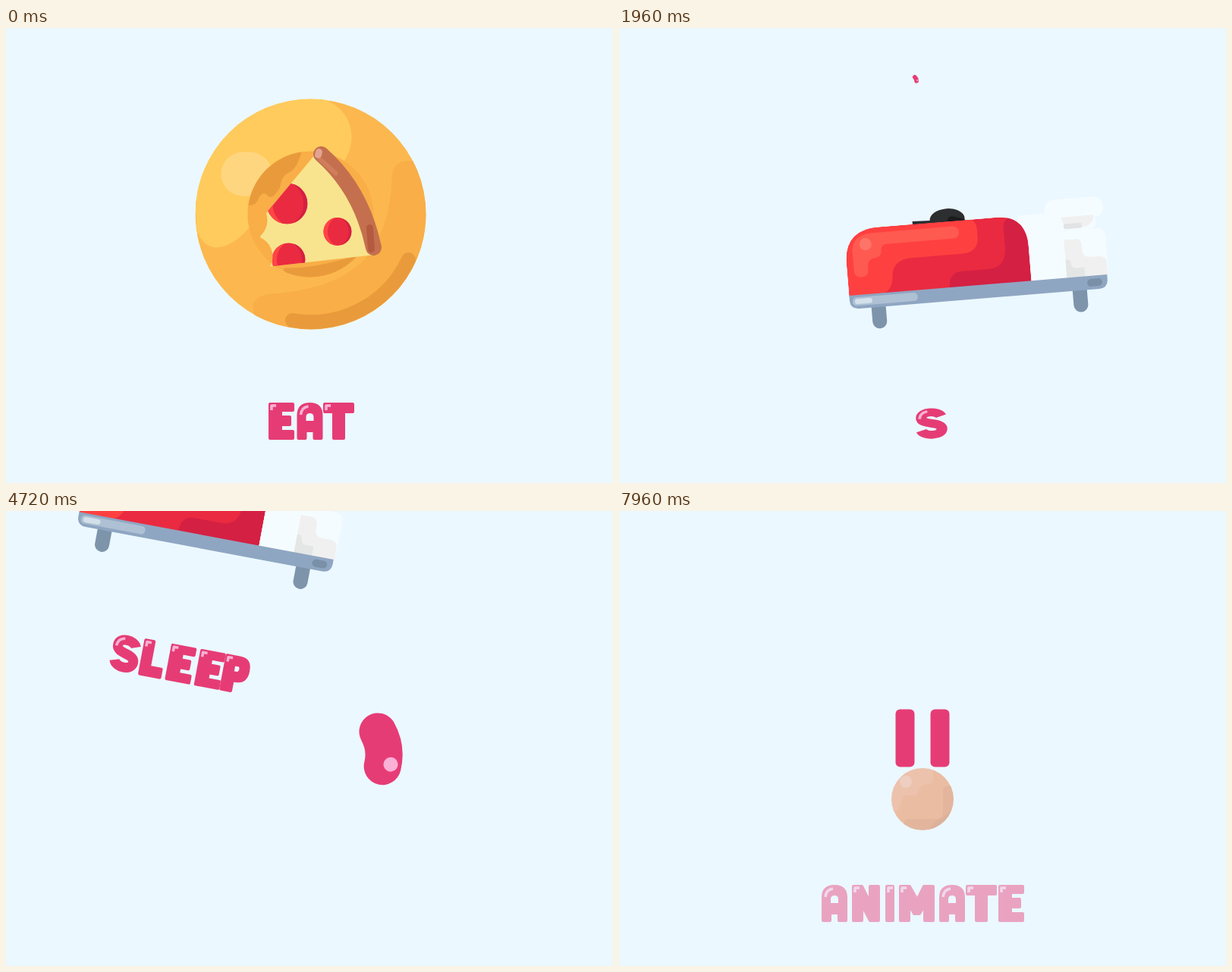
An HTML page for the animation above (8 s loop, 800 by 600 pixels).

```html
<!DOCTYPE html>
<html lang="en">
<head>
<meta charset="utf-8">
<title>Eat, sleep, animate</title>
<style>
  html, body { margin: 0; width: 100%; height: 100%; overflow: hidden; background: #ebf8ff; }
  svg { display: block; width: 100vw; height: 100vh; }
  .letter { fill: #e63c75; stroke: #e63c75; stroke-width: 4; stroke-linejoin: round; fill-rule: evenodd; }
  .letter .shine { fill: none; stroke: #f8b2d4; stroke-width: 3.5; }
  .letter .bend { fill: none; stroke-width: 13; }
  #snore { font: 900 15px Lato, sans-serif; text-anchor: middle; fill: #111; }
</style>
</head>
<body>
<svg viewBox="0 0 800 600">
  <defs>
    <clipPath id="plateClip"><circle r="152"/></clipPath>
    <clipPath id="sliceClip"><path id="slice" d="M7 -80Q64 -30 80 54L-44 68L-123 76Z"/></clipPath>
    <clipPath id="blanketClip"><path d="M-170 -31V-73Q-170 -119 -124 -119H31Q71 -119 71 -76V-31Z"/></clipPath>
    <clipPath id="ballClip"><circle r="41"/></clipPath>
    <mask id="bites" maskUnits="userSpaceOnUse" x="-160" y="-160" width="320" height="320">
      <rect x="-160" y="-160" width="320" height="320" fill="#fff"/>
      <circle cx="-85" cy="8" r="28"/><circle cx="-78" cy="56" r="28"/>
      <circle cx="-98" cy="70" r="40"/><circle cx="-110" cy="20" r="45"/>
      <g id="secondBite">
        <circle cx="-72" cy="0" r="38"/><circle cx="-62" cy="48" r="28"/><circle cx="-45" cy="70" r="24"/>
      </g>
    </mask>
  </defs>

  <g id="eat">
    <g clip-path="url(#plateClip)">
      <circle r="152" fill="#fcb84e"/>
      <path fill="#ffcb5c" d="M10 -155Q54 -140 54 -100Q52 -62 10 -45Q-55 -22 -75 10Q-100 44 -126 44Q-142 42 -150 22L-160 -160Z"/>
      <rect x="-118" y="-82" width="67" height="58" rx="29" fill="#ffd680"/>
      <path fill="#f9ae47" d="M155 -70H124Q107 -67 107 -46Q105 15 75 55Q40 96 -40 104Q-76 105 -76 122L-72 160H160Z"/>
      <path fill="none" stroke="#e99b3c" stroke-width="19" stroke-linecap="round" d="M129 60A142 142 0 0 1 -24 140"/>
      <circle r="83" fill="#f9ae47"/>
      <path fill="#e99b3c" d="M-82 -12A83 83 0 0 1 -12 -82Q-18 -60 -28 -55Q-38 -52 -40 -36Q-50 -18 -56 -24Q-62 -32 -68 -22Q-72 -10 -82 -12ZM-34 71Q5 72 62 54A83 83 0 0 1 -32 77Q-38 74 -34 71Z"/>
    </g>
    <g mask="url(#bites)">
      <use href="#slice" fill="#f8e48e"/>
      <g id="pepperoni" clip-path="url(#sliceClip)"></g>
      <g fill="none" stroke-linecap="round">
        <path stroke="#c4704e" stroke-width="21" d="M14 -79Q67 -32 83 44"/>
        <path stroke="#b45a3e" stroke-width="9" d="M78 18L80 46"/>
        <path stroke="#d07d5c" stroke-width="6" d="M13 -72L33 -54"/>
        <path stroke="#e2a491" stroke-width="9" d="M11 -82L10 -78"/>
      </g>
    </g>
    <g id="eatWord"></g>
  </g>

  <g id="sleep">
    <path fill="#2c2e30" d="M-56 -122A23 14 0 0 1 -10 -122V-112H-79V-123Z"/>
    <path fill="#1b1c1d" d="M-34 -119Q-31 -127 -24 -125T-10 -120V-112H-34Z"/>
    <g fill="#f5fcff">
      <path d="M60 -119H100L119 -110V-31H60Z"/>
      <rect x="96" y="-136" width="77" height="27" rx="12"/>
      <rect x="114" y="-114" width="48" height="20" rx="9"/>
      <rect x="114" y="-94" width="59" height="64" rx="10"/>
    </g>
    <g fill="#f1f0f0">
      <path d="M117 -112H160Q158 -98 144 -97H128Q118 -100 117 -112Z"/>
      <path d="M118 -31V-82H133Q141 -82 141 -72V-65Q142 -57 152 -57H162Q172 -57 172 -46V-31Z"/>
    </g>
    <g fill="#e1e3e4">
      <rect x="119" y="-103" width="24" height="7" rx="3"/>
      <path d="M118 -31V-56Q125 -57 125 -49Q126 -44 132 -44H142V-31Z" opacity=".8"/>
    </g>
    <path fill="#7d94ab" d="M-142 -20H-123V5A9.5 9.5 0 0 1 -142 5ZM124 -20H143V5A9.5 9.5 0 0 1 124 5Z"/>
    <g clip-path="url(#blanketClip)">
      <path fill="#ea2a40" d="M-170 -31V-119H71V-31Z"/>
      <path fill="#d42043" d="M50 -119Q40 -115 40 -105V-75Q38 -52 15 -52H-22Q-37 -50 -37 -31H71V-119Z"/>
      <path fill="#ff4040" d="M-170 -31V-119H-2Q5 -115 5 -105V-95Q5 -76 -16 -75H-85Q-110 -74 -111 -52Q-112 -36 -125 -31Z"/>
      <path fill="#ff5a50" d="M-161 -62V-90Q-160 -111 -135 -112H-27Q-19 -111 -19 -104T-27 -96H-115Q-123 -96 -123 -88T-131 -79Q-141 -79 -142 -70V-64Q-143 -55 -151 -55T-161 -62Z"/>
      <circle cx="-143" cy="-98" r="8" fill="#ff7468"/>
    </g>
    <path fill="#8fa6c2" d="M-170 -32H171V-26Q171 -14 159 -14H-158Q-170 -14 -170 -26Z"/>
    <rect x="-166" y="-29" width="86" height="11" rx="5" fill="#aec0d3"/>
    <rect x="-163" y="-27" width="23" height="7" rx="3.5" fill="#d3e0ea"/>
    <rect x="144" y="-28" width="20" height="10" rx="5" fill="#7a90a8"/>
    <text id="snore">Z</text>
    <g id="sleepWord"></g>
  </g>

  <g id="animate">
    <g id="animateWord"></g>
    <g id="onion">
      <circle r="41" fill="#b4c9f4" opacity=".55"/>
      <circle r="41" fill="#b0ecb8" opacity=".24"/>
      <circle r="41" fill="#b0ecb8" opacity=".38"/>
      <circle r="41" fill="#b0ecb8" opacity=".46"/>
    </g>
    <g id="ball">
      <g clip-path="url(#ballClip)">
        <circle r="41" fill="#e8742f"/>
        <path fill="#ee8148" d="M-41 18Q-30 16 -28 4T-18 -5H-10Q-5 -8 -4 -14T8 -20Q14 -22 14 -30V-45H-45Z"/>
        <path fill="#d96324" d="M41 -18H33Q27 -17 27 -10V18Q26 26 18 26H-20Q-27 28 -25 41H41Z"/>
        <path fill="#cb591d" d="M41 18H34Q31 20 28 23T18 29Q12 32 10 41H41Z"/>
        <circle cx="-22" cy="-23" r="8" fill="#f19a72"/>
      </g>
    </g>
  </g>

  <g id="pause" fill="#e63c75">
    <rect x="-35.5" y="-38" width="25" height="76" rx="6"/>
    <rect x="10.5" y="-38" width="25" height="76" rx="6"/>
  </g>

  <g id="pill">
    <path d="M-23 3Q0 -6 23 3" fill="none" stroke="#e63c75" stroke-width="49" stroke-linecap="round"/>
    <circle cx="22" cy="-8" r="9.5" fill="#fbb0d6"/>
  </g>
</svg>

<script>
const LOOP = 8000, CAP = 49;
const $ = id => document.getElementById(id);
const clamp01 = v => Math.max(0, Math.min(1, v));
const show = (el, on) => el.style.display = on ? '' : 'none';
const place = (el, x, y, angle = 0, sx = 1, sy = sx) =>
  el.setAttribute('transform', `translate(${x} ${y}) rotate(${angle}) scale(${sx} ${sy})`);

// Smooth curve through [time, ...values] keys, held at both ends.
function track(t, keys) {
  const last = keys.length - 1;
  if (t <= keys[0][0]) return keys[0].slice(1);
  if (t >= keys[last][0]) return keys[last].slice(1);
  const i = keys.findIndex(k => k[0] > t) - 1;
  const a = keys[i], b = keys[i + 1], span = b[0] - a[0], u = (t - a[0]) / span;
  const slope = (n, c) => {
    const p = keys[Math.max(0, n - 1)], q = keys[Math.min(last, n + 1)];
    return (q[c] - p[c]) / (q[0] - p[0]) * span;
  };
  return a.slice(1).map((v, j) => {
    const c = j + 1, d = b[c] - v, m = slope(i, c), n = slope(i + 1, c);
    return v + u * (m + u * (3 * d - 2 * m - n + u * (m + n - 2 * d)));
  });
}

// Lettering: width and outline of each glyph.
const GLYPHS = {
  E: [34, 'M2 2H32V10H16V19H28V29H16V38H32V47H2Z'],
  A: [34, 'M2 47V17Q2 2 17 2T32 17V47H23V37H11V47ZM10 26V19Q10 12 17 12T24 19V26Z'],
  T: [41, 'M2 2H39V12H27V47H14V12H2Z'],
  S: [38, 'M31 14C28 5 7 3 7 15C7 27 31 22 31 34C31 46 9 45 6 35'],
  L: [31, 'M2 2H13V36H29V47H2Z'],
  P: [35, 'M2 2H20Q33 2 33 17T20 33H15V47H2Z M13 12H19Q23 12 23 17T19 23H13Z'],
  N: [37, 'M2 2H13L24 24V2H35V47H24L13 26V47H2Z'],
  I: [12, 'M2 2H10V47H2Z'],
  M: [47, 'M2 47V2H14L24 20L33 2H45V47H34V26L27 38H20L13 26V47Z']
};

function makeWord(id, text, offsets) {
  const word = $(id);
  word.setAttribute('role', 'img');
  word.setAttribute('aria-label', text);
  word.innerHTML = [...text].map(ch => {
    const round = 'AS'.includes(ch);
    return `<g class="letter"><path class="${ch === 'S' ? 'bend' : ''}" d="${GLYPHS[ch][1]}"/>
      <path class="shine" d="${round ? 'M5 16Q6 6 15 5' : 'M4 10V4H10'}"/></g>`;
  }).join('');
  const letters = [...word.children];
  // Letters jump in one after another from the baseline.
  return (t, x, y, start) => letters.forEach((el, i) => {
    const age = t - start - i * 80, half = GLYPHS[text[i]][0] / 2;
    const [lift, sy] = track(age, JUMP), sx = 1 + (1 - sy) / 2;
    show(el, age >= 0);
    el.setAttribute('transform', `translate(${x + offsets[i] + half} ${y + CAP - lift})
      scale(${sx} ${sy}) translate(${-half} ${-CAP})`);
  });
}

// age, lift, vertical stretch
const JUMP = [[0, 0, .75], [20, 0, .82], [100, 19, .96], [180, 33, 1.16], [260, 36, 1.19],
  [350, 22, 1.06], [440, 0, .88], [520, 0, 1.03], [600, 0, 1]];

// time, x, y, angle
const PLATE = [[0, 401.5, 245.5, 0], [400, 388, 246, -.5], [640, 330, 260, -3], [840, 206, 290, -6.6],
  [880, 170, 298, -7.3], [1000, 40, 325, -9.5], [1200, -260, 385, -13]];
const BED = [[1280, 1150, 470, -16], [1480, 700, 400, -10], [1720, 512, 374, -6.5], [1960, 475.5, 371, -4.7],
  [2560, 421, 372, -2], [3400, 388, 373.5, .6], [3560, 380.5, 373.5, 1.1], [4200, 341, 370, 4],
  [4480, 310, 270, 7], [4720, 258, 65, 10.6], [4900, 190, -180, 14], [5050, 130, -420, 17]];
const CAPTION = [[5300, 286, 493, 2.4], [5560, 283, 493, 2], [6760, 282, 493, .8], [7560, 272, 493, .2], [7960, 267, 493, 0]];

// time, x, y, heading, scale
const PILLS = [
  [[600, 560, 190, 20, 0], [880, 669, 326, 58, 1.08], [1100, 640, 470, 130, 1.05], [1350, 380, 500, 210, 1],
    [1560, 230, 200, 290, .9], [1720, 300, 40, 360, .7], [1960, 391, 67, 425, .12], [2000, 398, 82, 430, 0]],
  [[4440, 400, 230, 10, 0], [4720, 496, 313, 82, 1], [4950, 440, 430, 150, 1], [5150, 280, 440, 210, 1],
    [5350, 185, 320, 280, .9], [5560, 304, 223, 373, .72], [5760, 400, 245, 395, .3], [5900, 430, 290, 420, 0]]
];

const THROW = [[5320, 719, 258], [5400, 675, 220], [5480, 632, 202], [5560, 607, 219],
  [5640, 580, 257], [5720, 563, 329], [5800, 560, 380]];
// start, end, from x, to x, height
const BOUNCES = [[5800, 6360, 560, 300, 122], [6360, 6780, 300, 388, 62], [6780, 7060, 388, 406, 28]];
const ONION_STEPS = [-80, 240, 160, 80];

function ballAt(t) {
  let x, y = 380;
  const hop = BOUNCES.find(b => t >= b[0] && t < b[1]);
  if (t < 5800) [x, y] = track(t, THROW);
  else if (hop) {
    const [start, end, from, to, height] = hop, p = (t - start) / (end - start);
    x = from + (to - from) * p;
    y -= height * 4 * p * (1 - p);
  } else [x] = track(t, [[7060, 406], [7960, 400]]);
  const squash = BOUNCES.reduce((sum, [hit], i) => sum + .12 / (i + 1) * Math.exp(-(((t - hit) / 75) ** 2)), 0);
  return [x, y + 41 * squash, 0, 1 + squash * .75, 1 - squash];
}

$('pepperoni').innerHTML = [[-31, -14, 27], [35.5, 23, 18.5], [-29, 60, 22]].map(([x, y, r]) =>
  `<g transform="translate(${x} ${y}) scale(${r})"><circle r="1" fill="#ea2a40"/>
   <path fill="#ff4545" d="M-.2 -.98A1 1 0 0 0 -.2 .98A1.2 1.2 0 0 1 -.2 -.98"/>
   <path fill="#d42043" d="M.3 -.95A1 1 0 0 1 .3 .95A1.15 1.15 0 0 0 .3 -.95"/></g>`).join('');

const setEat = makeWord('eatWord', 'EAT', [0, 37.5, 72]);
const setSleep = makeWord('sleepWord', 'SLEEP', [0, 40, 76, 115, 149]);
const setAnimate = makeWord('animateWord', 'ANIMATE', [0, 40, 84, 102, 155, 190, 233]);

function draw(t) {
  show($('eat'), t < 1200);
  place($('eat'), ...track(t, PLATE));
  show($('secondBite'), t >= 440);
  setEat(t, -55.5, 248.5, -2000);

  show($('sleep'), t > 1280 && t < 5050);
  place($('sleep'), ...track(t, BED));
  setSleep(t, -94.5, 116, 1940);
  const snore = ((t - 2400) % 1000) / 1000;
  show($('snore'), t > 2400 && t < 4240);
  place($('snore'), -33 + 4 * Math.sin(snore * 6), -139 - 26 * snore, 0, .4 + .6 * clamp01(snore * 7));
  $('snore').style.opacity = clamp01((1 - snore) * 5);

  show($('animate'), t >= 5300);
  $('animate').style.opacity = 1 - .55 * clamp01((t - 7680) / 260);
  const [x, y, tilt] = track(t, CAPTION);
  place($('animateWord'), x + 133.5, y + 24.5, tilt);
  setAnimate(t, -133.5, -24.5, 5300);
  show($('ball'), t >= 5320);
  place($('ball'), ...ballAt(t));
  show($('onion'), t >= 5320 && t < 7200);
  [...$('onion').children].forEach((ghost, i) => place(ghost, ...ballAt(t + ONION_STEPS[i])));

  const [grow] = track(t, [[7600, 0], [7720, 1.1], [7840, .98], [7920, 1]]);
  show($('pause'), t > 7600);
  place($('pause'), 400, 299.5, 0, grow);

  const path = PILLS[t < 3000 ? 0 : 1], [px, py, heading, size] = track(t, path);
  show($('pill'), t > path[0][0] && t < path[path.length - 1][0]);
  place($('pill'), px, py, heading, Math.max(0, size));
}

const began = performance.now();
(function frame() {
  draw((performance.now() - began) % LOOP);
  requestAnimationFrame(frame);
})();
</script>
</body>
</html>
```
